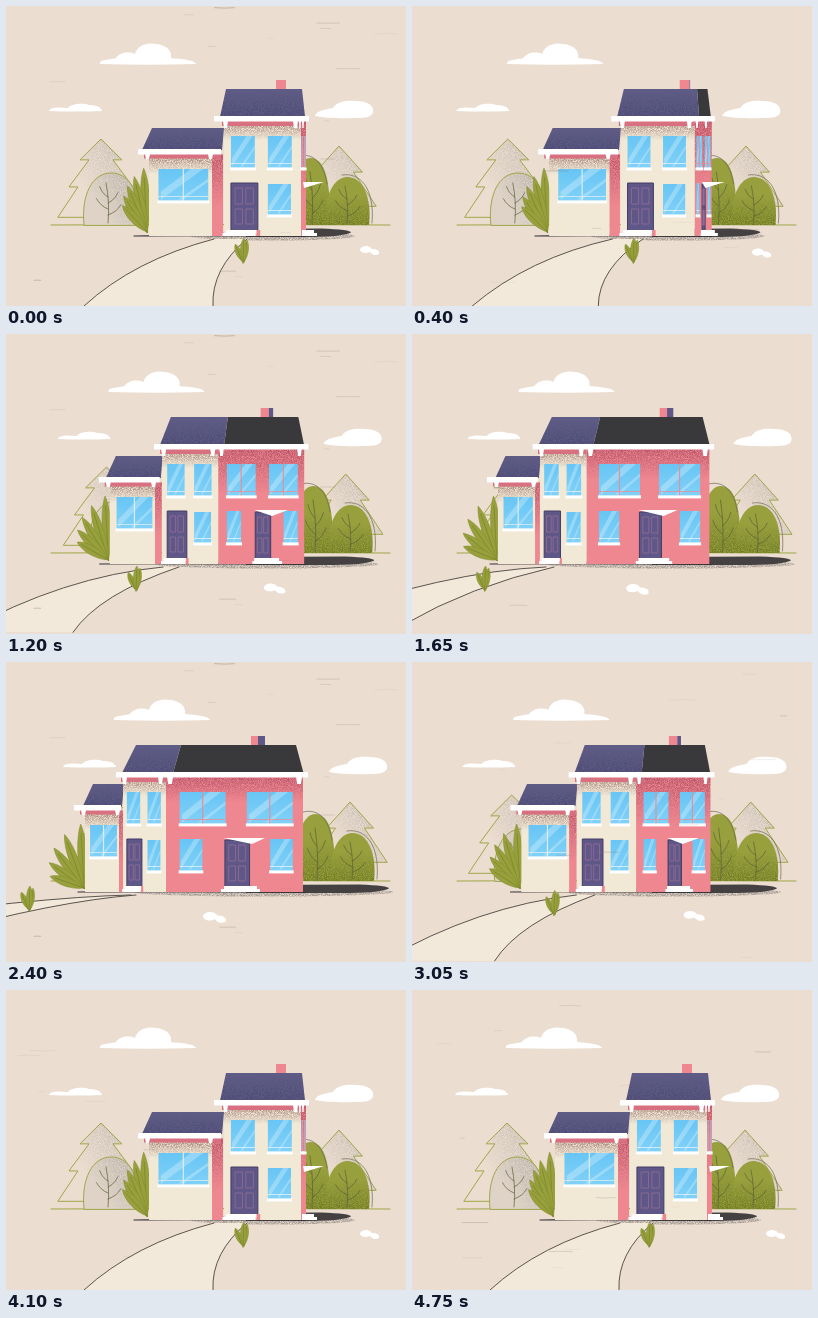
Animation of 400 by 300 pixels, one loop 4800 ms. Source, as an HTML page:

```html
<!DOCTYPE html>
<html lang="en">
<head>
<meta charset="utf-8">
<title>Turning house</title>
<style>
html,body{margin:0;width:100%;height:100%;overflow:hidden;background:#ebddd0}
svg{display:block;width:100%;height:100%}
</style>
</head>
<body>
<svg viewBox="0 0 400 300">
  <defs>
    <filter id="grain" filterUnits="userSpaceOnUse" x="0" y="0" width="400" height="300" color-interpolation-filters="sRGB">
      <feTurbulence type="fractalNoise" baseFrequency="1.1" numOctaves="2" seed="4"/>
      <feColorMatrix values="0 0 0 0 0  0 0 0 0 0  0 0 0 0 0  0 0 0 2.4 -.6" result="n"/>
      <feComposite in="SourceGraphic" in2="n" operator="in"/>
    </filter>
    <filter id="rough" filterUnits="userSpaceOnUse" x="0" y="0" width="400" height="300" color-interpolation-filters="sRGB">
      <feTurbulence type="fractalNoise" baseFrequency=".13" seed="7"/>
      <feDisplacementMap in="SourceGraphic" scale="1.3" xChannelSelector="R" yChannelSelector="G"/>
    </filter>
    <linearGradient id="glass" x2="0" y2="1"><stop stop-color="#68c5f4"/><stop offset="1" stop-color="#80d1f8"/></linearGradient>
    <linearGradient id="brown" x2="0" y2="1"><stop stop-color="#8a5d55" stop-opacity=".75"/><stop offset="1" stop-color="#8a5d55" stop-opacity="0"/></linearGradient>
    <linearGradient id="wine" x2="0" y2="1"><stop stop-color="#a04058" stop-opacity=".75"/><stop offset="1" stop-color="#a04058" stop-opacity="0"/></linearGradient>
    <linearGradient id="dusk" x2="0" y2="1"><stop stop-color="#2c2a55" stop-opacity="0"/><stop offset="1" stop-color="#2c2a55" stop-opacity=".4"/></linearGradient>
    <linearGradient id="moss" x2="0" y2="1"><stop offset=".4" stop-color="#4e5a10" stop-opacity="0"/><stop offset="1" stop-color="#4e5a10" stop-opacity=".55"/></linearGradient>
    <linearGradient id="ash" x1="1" x2="0" y2=".6"><stop stop-color="#8f8a84" stop-opacity=".6"/><stop offset=".8" stop-color="#8f8a84" stop-opacity="0"/></linearGradient>
  </defs>
  <rect width="400" height="300" fill="#ebddd0"/>
  <g id="scene"></g>
</svg>
<script>
const LOOP = 4800, STEP = 50;
const CREAM = '#f1e8d6', PINK = '#ef8790', NAVY = '#5f5d86', COAL = '#39383a',
      PLUM = '#5f5788', OLIVE = '#97a03d', LINE = '#a0a64a', INK = '#4a4540';
const scene = document.getElementById('scene');

const smooth = s => { s = Math.min(1, Math.max(0, s)); return s * s * (3 - 2 * s); };
const mix = (a, b, k) => a + (b - a) * k;

// shape helpers
const box = (x1, x2, y1, y2, fill) =>
  x2 - x1 < .3 ? '' : `<rect x="${x1}" y="${y1}" width="${x2 - x1}" height="${y2 - y1}" fill="${fill}"/>`;
const poly = (pts, fill) => `<polygon points="${pts}" fill="${fill}"/>`;
const path = (d, fill, stroke = 'none', w = 1, more = '') =>
  `<path d="${d}" fill="${fill}" stroke="${stroke}" stroke-width="${w}" stroke-linecap="round" stroke-linejoin="round" ${more}/>`;
const stroke = (d, color, w, more) => path(d, 'none', color, w, more);
const grain = s => `<g filter="url(#grain)">${s}</g>`;
const rough = s => `<g filter="url(#rough)">${s}</g>`;
const move = (x, y, s) => `<g transform="translate(${x} ${y})">${s}</g>`;
const bracket = (x, y, w, h) => path(`M${x} ${y}h${w}l${-w * .2} ${h}h${-w * .6}z`, '#fff');

function leaf(x, y, angle, len, w) {
  return `<g transform="translate(${x} ${y}) rotate(${angle})">`
    + path(`M0 0C${-w} ${-len * .35} ${-w * .8} ${-len * .8} 0 ${-len}C${w * .8} ${-len * .8} ${w} ${-len * .35} 0 0Z`, OLIVE, '#838e2c', .5)
    + stroke(`M0 0V${-len * .85}`, '#7a8526', .7) + '</g>';
}

function arch(l, r, top) {
  const m = (l + r) / 2, h = (r - l) / 2;
  return `M${l} 219C${l - 3} ${top + 22} ${m - h * .7} ${top} ${m} ${top}C${m + h * .7} ${top} ${r + 3} ${top + 20} ${r} 219Z`;
}

// a bent trunk with twigs on alternating sides
function veins(x, y, h, w) {
  let d = `M${x} ${y}Q${x + 2} ${y - h * .5} ${x - 2} ${y - h}`;
  for (let i = 0; i < 4; i++) {
    const side = i % 2 ? -1 : 1, s = 1 - i * .12;
    d += `M${x} ${y - h * (.2 + i * .15)}q${side * w * s * .7} ${-h * .08} ${side * w * s} ${-h * .26}`;
  }
  return stroke(d, '#5e5f3a', .7);
}

function pine(x, y, tiers, w, h) {
  const half = [[0, 0]];
  for (let i = 1; i <= tiers; i++) {
    const out = mix(10, w, i / tiers), down = h * (i / tiers) ** 1.2;
    half.push([out, down]);
    if (i < tiers) half.push([out - 9, down]);
  }
  const side = k => half.map(([a, b]) => `${x + k * a} ${y + b}`);
  return 'M' + side(-1).reverse().concat(side(1)).join('L') + 'Z';
}

function pane(x1, x2, y1, y2, bar) {
  const w = x2 - x1, h = y2 - y1;
  if (w < 1) return '';
  const at = (u, v) => `${x1 + w * u},${y1 + h * v} `;
  let s = box(x1, x2, y1, y2, 'url(#glass)');
  s += `<g opacity=".27">${poly(at(.05, .7) + at(.65, 0) + at(.9, 0) + at(.05, .95), '#fff')
    + poly(at(.4, .95) + at(1, .3) + at(1, .4) + at(.5, .95), '#fff')}</g>`;
  if (bar) s += box(x1 + w / 2 - .6, x1 + w / 2 + .6, y1, y2, bar);
  return s + box(x1, x2, y2 - 5, y2 - 4.2, bar || '#e4f3fa') + box(x1 - 1, x2 + 1, y2 - .6, y2 + 2.4, '#fff');
}

function door(x1, x2, y1, y2) {
  const w = x2 - x1, pw = w * .26;
  if (w < 1) return '';
  let s = box(x1, x2, y1, y2, PLUM) + stroke(`M${x1} ${y2}V${y1}H${x2}V${y2}`, '#433d66', 1);
  for (const u of [.17, .57])
    for (const [y, h] of [[5, 16], [26, 15]])
      s += stroke(`M${x1 + w * u} ${y1 + y}h${pw}v${h}h${-pw}z`, '#9a7096', .7);
  return s;
}

const stairs = (a, b, c, d) => box(a, b, 224, 227.300, '#fff') + box(c, d, 227, 230, '#fff');

function clouds(p) {
  return move(14 * p, 0,
    path('M94 58C93 53 104 54 110 52C113 47 122 45 129 48C131 39 142 36 150 38C161 39 166 45 165 52C175 53 189 54 190 58Q142 59.500 94 58Z', '#fff')
    + path('M43 105C44 101 53 101 62 102C66 97 78 97 83 99C90 99 95 101 96 105Q70 106 43 105Z', '#fff')
    + path('M309 110C310 105 320 103 327 102C331 95 342 94 350 95C361 95 368 99 367 106C366 111 360 112 350 112Q325 113 309 110Z', '#fff'));
}

function puff(p) {
  return `<g transform="translate(${mix(354, 197, p)} ${250 - 10 * (1 - p) ** 3}) scale(${1 + .2 * p})">`
    + path('M0 4C0 0 9-2 12 3C17 3 20 5 19 8C16 10 12 9 10 6C5 8 1 7 0 4Z', '#fff') + '</g>';
}

function trees(p) {
  const fir = d => grain(path(d, 'url(#ash)')) + stroke(d, LINE, 1);
  const bush = d => path(d, OLIVE) + grain(path(d, 'url(#moss)'));
  const rim = d => stroke(d, '#6e6a52', .7);
  const mound = arch(78, 132, 167);
  return stroke('M45 219Q200 218 384 219', LINE, 1.200)
    + move(9 * p, 0, fir(pine(95, 133, 3, 43, 78)) + path(mound, '#dfd3c7') + fir(mound) + veins(102, 217, 40, 13))
    + move(11 * p, 0, fir(pine(333, 140, 2, 37, 60)))
    + move(5 * p, 0, bush(arch(286, 323, 152)) + veins(306, 218, 52, 11) + rim('M292 150C308 146 318 158 321 178')
      + bush(arch(320, 363, 171)) + veins(341, 218, 38, 13) + rim('M336 169C354 166 369 182 366 217'));
}

// both edges swing left about the doorstep
function walkway(p, g) {
  const k = 1 - (1 - p) ** 1.35;
  const left = [mix(128, 30, k), mix(254, 235, p), 78 - 240 * g, 300 - 38 * g ** 4];
  const right = [mix(205, 50, k), mix(263, 239, g ** 3), 207 - 280 * g, 300 - 27 * g ** 4];
  const l0 = `${mix(208, 125, p)} 233`, r0 = `${mix(241, 130, p)} 233`;
  const [a, b, c, d] = left, [e, f, x, y] = right;
  return path(`M${l0}Q${a} ${b} ${c} ${d}L${x} ${y}Q${e} ${f} ${r0}Z`, '#f2e9da')
    + rough(stroke(`M${l0}Q${a} ${b} ${c} ${d}M${r0}Q${e} ${f} ${x} ${y}`, INK, .9));
}

function shade(m) {
  const r = m(345, 383), l = m(128, 72);
  return grain(`<ellipse cx="${(l + r) / 2 + 30}" cy="230" rx="${(r - l) / 2 - 26}" ry="4.500" fill="#3b3838" opacity=".4"/>`)
    + path(`M240 223L${r - 30} 222.500Q${r} 223.500 ${r} 226.500Q${r - 8} 230.500 ${r - 40} 231L240 231Z`, '#454143')
    + stroke(`M${l} 230Q200 229 300 230.500`, '#38343a', 1.200);
}

function fern(m) {
  let s = '';
  for (let i = 0; i < 5; i++) s += leaf(m(141, 78), 226, -3 - i * m(10, 17), 64 - 7 * i, 6.500);
  return s;
}

function wing(m) {
  const l = m(143, 79), r = m(206, 113), end = m(215, 115), at = u => mix(l, r, u);
  const roof = `${m(146, 87)},122 ${end + 3},122 ${end + 1},144 ${m(136, 77)},144`;
  return rough(box(l, r, 148, 230, CREAM) + box(r, end + 2, 148, 230, PINK)
    + grain(box(l, r, 151, 168, 'url(#brown)') + box(r, end + 2, 149, 200, 'url(#wine)'))
    + box(l - 5, end, 148, 152.500, '#d9707f') + poly(roof, NAVY) + grain(poly(roof, 'url(#dusk)'))
    + box(m(132, 68), end, 143, 148.500, '#fff')
    + bracket(l - 4, 148, 5, 5) + bracket(r - 4, 148, 5, 5)
    + pane(at(.15), at(.94), 163, 195, '#d9eef6'));
}

function main(m) {
  const l = m(218, 117), edge = m(295, 160), r = m(300, 297);
  const front = u => mix(l, edge, u), side = u => mix(edge, r, u);
  const ridge = m(296, 175), hip = m(299, 167), split = m(280, 252);
  const roof = `${m(220, 130)},83 ${ridge},83 ${hip},111 ${m(214, 116)},111`;

  let s = box(m(270, 245), split, 74, 84, PINK) + box(split, m(280, 259), 74, 84, PLUM)
    + box(l, edge, 114, 230, CREAM) + box(edge, r, 114, 230, PINK)
    + grain(box(l, edge, 118, 134, 'url(#brown)') + box(edge, r, 115, m(190, 140), 'url(#wine)'))
    + box(l - 2, edge, 115, 120, '#d9707f')
    + poly(`${ridge},83 ${m(296, 290)},83 ${m(299, 297.5)},111 ${hip},111`, COAL)
    + poly(roof, NAVY) + grain(poly(roof, 'url(#dusk)'))
    + box(m(208, 110), m(303, 302), 110, 115.500, '#fff')
    + bracket(l - 1, 115, 5, 7) + bracket(edge - 8, 115, 5, 7)
    + bracket(edge + 1, 115, m(2, 6), 7) + bracket(r - 7, 115, m(2, 6), 7);

  for (const u of [.09, .57]) s += pane(front(u), front(u + .31), 130, 162);
  s += pane(front(.57), front(.87), 178, 209) + door(front(.09), front(.44), 177, 224)
    + box(front(.42), front(.47), 224, 230, PINK) + stairs(front(.03), front(.42), front(-.02), front(.4));

  for (const u of [.1, .59]) s += pane(side(u), side(u + .335), 130, 162, '#e58f9c');
  for (const u of [.1, .76]) s += pane(side(u), side(u + .165), 177, 209);
  s += door(side(.43), side(.61), 178, 224)
    + stairs(m(296, 218), m(308, 251), m(296, 215), m(311, 254))
    + poly(`${side(.42)},176 ${m(318, 259)},176 ${m(298, 246)},182`, '#fff');
  return rough(s);
}

function sprout(g, lift) {
  const x = mix(237, 23, g), y = 257 - 8 * lift;
  return leaf(x - 1, y - 2, -22, 18, 4) + leaf(x + 1, y - 1, 8, 22, 4) + leaf(x, y, 2, 25, 4.500);
}

// scratches that flicker, now dense, now sparse
function scratches(step) {
  const n = step % 12, count = 9 + 8 * Math.cos(n * Math.PI / 3);
  let seed = n * 7919 + 17, s = '';
  const rnd = () => (seed = (seed * 16807) % 2147483647) / 2147483647;
  rnd(); rnd();
  for (let i = 0; i < count; i++) {
    const w = 4 + rnd() * 22;
    s += stroke(`M${rnd() * 390} ${rnd() * 298}q${w / 2} ${rnd() * 2 - 1} ${w} 0`, '#857b71', .6, `opacity="${.12 + rnd() ** 3 * .6}"`);
  }
  return s;
}

function draw(t) {
  const rising = t < LOOP / 2, back = t - LOOP / 2;
  const p = rising ? smooth((t - 20) / 2050) : 1 - smooth(back / 1345);   // house
  const g = rising ? smooth(t / 2400) : 1 - smooth(back / 1210);          // ground in front
  const lift = rising ? smooth((t - 1650) / 750) : g;
  const m = (a, b) => mix(a, b, p);
  scene.innerHTML = clouds(p) + trees(p) + shade(m) + walkway(p, g) + fern(m)
    + wing(m) + main(m) + sprout(g, lift) + puff(p) + scratches(t / STEP);
}

let last = -1;
function tick() {
  const t = Math.floor(performance.now() % LOOP / STEP) * STEP;
  if (t !== last) draw(last = t);
  requestAnimationFrame(tick);
}
tick();
</script>
</body>
</html>
```
